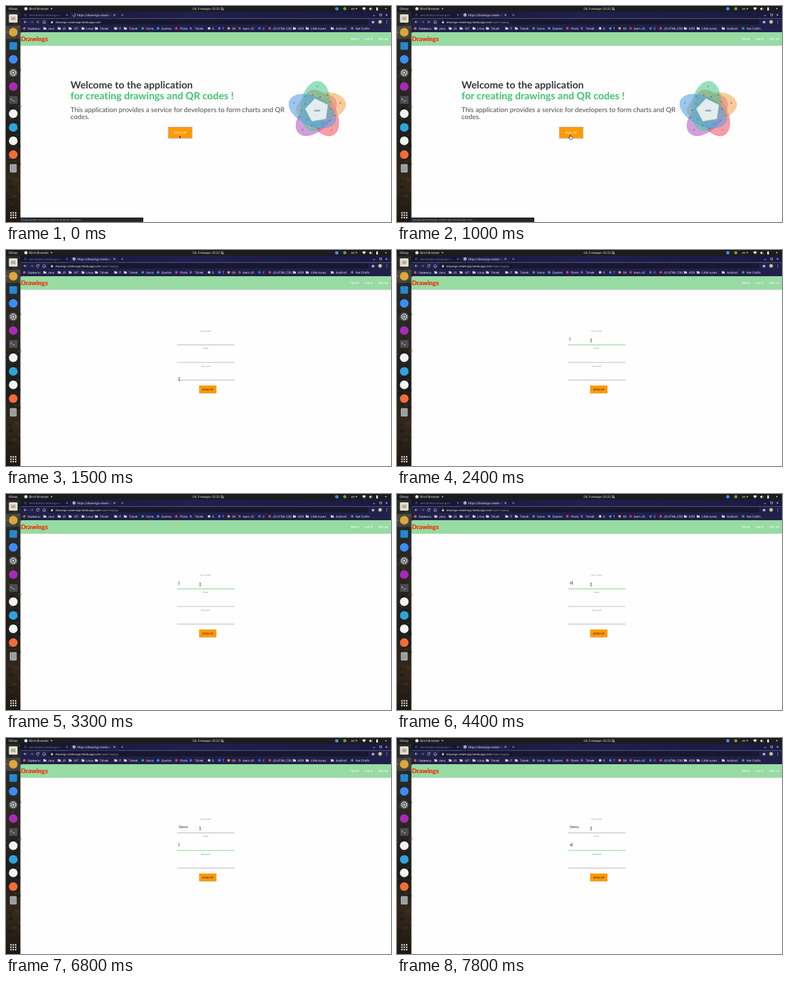
An HTML page that plays this animation: 600x338 px, repeating every 8000 ms.

```html
<!DOCTYPE html>
<html lang="ru">
<head>
<meta charset="utf-8">
<title>Sign up</title>
<style>
html, body { margin: 0; width: 100%; height: 100%; overflow: hidden; background: #fdfdfd; }
svg { display: block; width: 100vw; height: 100vh; }
text { font-family: Roboto, "Noto Sans", sans-serif; white-space: pre; text-rendering: geometricPrecision; font-variant-ligatures: none; }
.lato { font-family: Lato, sans-serif; }
.mid { text-anchor: middle; }
</style>
</head>
<body>
<svg id="stage" viewBox="0 0 600 338">
  <defs>
    <linearGradient id="wall" x1="0" y1="0" x2="0" y2="1">
      <stop offset="0" stop-color="#262a29"/><stop offset=".4" stop-color="#2b2620"/>
      <stop offset=".6" stop-color="#1b1d1d"/><stop offset=".8" stop-color="#33281a"/><stop offset="1" stop-color="#1d1812"/>
    </linearGradient>
    <linearGradient id="sky">
      <stop offset="0" stop-color="#15152f"/><stop offset=".45" stop-color="#201f4e"/><stop offset="1" stop-color="#191940"/>
    </linearGradient>
    <linearGradient id="fade"><stop offset=".7" stop-color="#20204a" stop-opacity="0"/><stop offset="1" stop-color="#20204a"/></linearGradient>
    <linearGradient id="fadeDark"><stop offset=".6" stop-color="#161632" stop-opacity="0"/><stop offset="1" stop-color="#161632"/></linearGradient>
    <pattern id="hatch" width="2" height="2" patternUnits="userSpaceOnUse" patternTransform="rotate(35)">
      <rect width="2" height=".9" fill="#fff" fill-opacity=".2"/>
    </pattern>
  </defs>
</svg>
<script>
const LOOP = 8000, STEP = 100;
const stage = document.getElementById('stage');

function el(tag, attrs, parent = stage) {
  const node = document.createElementNS('http://www.w3.org/2000/svg', tag);
  for (const key in attrs) node.setAttribute(key, attrs[key]);
  return parent.appendChild(node);
}
const group = (parent, attrs = {}) => el('g', attrs, parent);
const rect = (x, y, width, height, fill, parent, more) => el('rect', { x, y, width, height, fill, ...more }, parent);
const dot = (cx, cy, r, fill, parent, more) => el('circle', { cx, cy, r, fill, ...more }, parent);
const stroke = (d, color, width, parent, more) =>
  el('path', { d, fill: 'none', stroke: color, 'stroke-width': width, ...more }, parent);
function label(x, y, size, fill, string, parent, more) {
  const node = el('text', { x, y, 'font-size': size, fill, ...more }, parent);
  node.textContent = string;
  return node;
}
function random(seed) {
  return () => (seed = seed * 16807 % 2147483647) / 2147483647;
}
const show = (node, on) => node.setAttribute('visibility', on ? 'visible' : 'hidden');
const LATO = { class: 'lato' }, LATO_MID = { class: 'lato mid' }, BOLD = { class: 'lato', 'font-weight': 700 };
const HOST = 'drawings-create-app.herokuapp.com';

// Page background and header
rect(22, 40, 578, 298, '#fefefe');
rect(22, 62, 578, .7, '#000', stage, { opacity: .1 });
rect(22, 41, 578, 21, '#98dba3');
label(23.2, 55.2, 10, '#b3200c', 'Drawings', stage, BOLD);
label(22.8, 54.8, 10, '#f4501c', 'Drawings', stage, BOLD);
[[537.7, 'Home'], [559, 'Log in'], [580, 'Sign up']].forEach(([x, name]) => label(x, 53, 4.8, '#fff', name, stage, LATO));

// Welcome page
const welcome = group(stage);
label(100.5, 128.5, 15.6, '#3b3b3b', 'Welcome to the application', welcome, BOLD);
label(100.5, 145.5, 15.6, '#40c56f', 'for creating drawings and QR codes !', welcome, BOLD);
label(100.5, 165.5, 10.6, '#4c4c4c', 'This application provides a service for developers to form charts and QR', welcome, LATO);
label(100.5, 177.3, 10.6, '#4c4c4c', 'codes.', welcome, LATO);
rect(253, 189.5, 37, 17.5, '#ff9a05', welcome, { stroke: '#b9b3a8', 'stroke-width': 1 });
label(271.3, 200, 5, '#fff3dc', 'SIGN UP', welcome, LATO_MID);

// Five-set diagram: one ellipse turned in five steps
const chart = group(welcome, { transform: 'translate(485 163.5)' });
[[2, '#f0414f'], [3, '#a846bd'], [1, '#f29a3c'], [0, '#35c583'], [4, '#3f95e0']].forEach(([turn, fill]) => {
  const petal = group(chart, { transform: `rotate(${turn * 72}) translate(-3.2 -7) rotate(8)` });
  el('ellipse', { rx: 22.3, ry: 39, fill, 'fill-opacity': .56 }, petal);
  el('ellipse', { rx: 22.3, ry: 39, fill: 'url(#hatch)', stroke: fill, 'stroke-width': .6, 'stroke-dasharray': '1 .7' }, petal);
});
const polar = (r, degrees) => [r * Math.cos(degrees * Math.PI / 180), r * Math.sin(degrees * Math.PI / 180)];
el('polygon', {
  points: [0, 1, 2, 3, 4].map(i => polar(19.3, i * 72 - 100).map(v => v.toFixed(1))).join(' '),
  fill: '#e4ecee', stroke: '#8ba0a4', 'stroke-width': .6, 'stroke-linejoin': 'round'
}, chart);
function mark(r, degrees, string, size) {
  const [x, y] = polar(r, degrees);
  label(x, y + 1, size, '#2c3438', string, chart, { class: 'mid' });
}
[...'ABCDE'].forEach((name, i) => {
  const angle = i * 72 - 90, next = 'ABCDE'[(i + 1) % 5];
  mark(38, angle, name, 3.4);
  mark(29, angle + 32, name + next, 2.5);
  mark(22, angle + 12, name + next, 2.2);
  mark(25, angle - 16, next + name, 2.2);
});
label(0, 1.1, 3.5, '#20262a', 'NODE', chart, { class: 'mid' });

// Sign-up form
const form = group(stage);
const fields = [['Your Name', 127.6, 148.5], ['Email', 155.2, 176], ['Password', 183, 203.7]].map(([name, top, base]) => ({
  title: label(311, top, 3.5, '#9e9e9e', name, form, LATO_MID),
  line: rect(266.5, base - .35, 89.5, .7, '#9e9e9e', form),
  value: label(269.2, base - 7.3, 5.3, '#1c1c1c', '', form, { style: 'font-family:"Noto Sans",sans-serif' }),
  caret: rect(269.2, base - 12.2, .6, 6, '#222', form)
}));
rect(301, 212.8, 27, 12, '#000', form, { rx: 1, opacity: .22 });
rect(301, 212, 27, 12, '#ff9a05', form, { rx: .8 });
label(314.5, 219.7, 4.5, '#20180a', 'SIGN UP', form, LATO_MID);

// Desktop panel
rect(0, 0, 600, 9, '#1c1c1e');
const LIGHT = '#e6e6e6';
label(4, 6, 4.9, LIGHT, 'Обзор');
dot(31, 4.3, 2.5, '#e4e4e4');
label(36, 6, 4.9, LIGHT, 'Birch Browser');
label(291, 6, 4.8, LIGHT, 'Сб, 9 января  02:22');
stroke('M335 5.8h4l-.7-1v-1.5q-1.3-2-2.6 0v1.5zM334.5 2l5 5', LIGHT, .6);
dot(515.5, 4.3, 2.6, '#3b8df0');
dot(528, 4.3, 2.5, '#5aa637');
label(538, 6, 4.9, LIGHT, 'en');
const drop = x => el('path', { d: `M${x - 1.5} 3.6h3l-1.5 2z`, fill: LIGHT });
[71, 546, 592].forEach(drop);
el('path', { d: 'M555 3.2q3-2.4 6 0l-3 3.6z', fill: LIGHT });
el('path', { d: 'M566 3.6h1.2l1.8-1.5v5l-1.8-1.5H566z', fill: LIGHT });
stroke('M570 3q1.4 1.6 0 3.2', LIGHT, .6);
rect(577, 2.2, 2.6, 4.9, LIGHT);

// Browser frame
rect(22, 9, 578, 10.5, 'url(#sky)');
rect(22, 19.5, 578, 21.5, '#20204a');
const rnd = random(71);
for (let i = 0; i < 60; i++) dot(190 + rnd() * 370, 10 + rnd() * 8.5, .2 + rnd() * .25, '#8286b4', stage, { opacity: .4 });
dot(30, 14, 2.2, '#343849');
label(36, 15.7, 4.6, '#737889', 'deniskrelov/drawings-cr');
rect(60, 10, 32, 9, 'url(#fadeDark)');
el('path', { d: 'M98 19.5q2 0 2-2v-5q0-2 2-2h70q2 0 2 2v5q0 2 2 2z', fill: '#20204a' });
label(111, 15.7, 4.7, '#e8e8ee', 'https://' + HOST.slice(0, 17));
rect(135, 11, 30, 8, 'url(#fade)');
rect(164.9, 11, 8, 8, '#20204a');
const cross = (x, y, r, color) =>
  stroke(`M${x - r} ${y - r}l${2 * r} ${2 * r}M${x + r} ${y - r}l${-2 * r} ${2 * r}`, color, .7);
cross(95, 14, 1.3, '#9aa0b0');
cross(169, 14, 1.3, '#d8d8e0');
stroke('M179.2 14h4M181.2 12v4', '#8c8ea6', .7);
const spinner = stroke('M106 11.8a2.2 2.2 0 1 1-2.2 2.2', '#b9c3df', .8);
const tabIcon = group(stage);
dot(106, 14, 2.4, '#d4d8e0', tabIcon);
stroke('M103.6 14h4.8M106 11.6v4.8', '#454a60', .5, tabIcon);
stroke('M572 15h3.2', LIGHT, .7);
rect(582.5, 12.5, 3, 3, 'none', stage, { stroke: LIGHT, 'stroke-width': .6 });
cross(593, 14, 1.4, LIGHT);

// Toolbar
rect(66, 20.7, 499, 8.3, '#17172f', stage, { rx: 4.1 });
stroke('M32.3 25h-4.4m2-2l-2 2l2 2', '#dcdce4', .7);
stroke('M37.7 25h4.4m-2-2l2 2l-2 2', '#7a7d8c', .7);
const stopIcon = cross(49.5, 25, 1.7, '#dcdce4');
const reloadIcon = stroke('M51.4 24a2.1 2.1 0 1 0 .1 1.9M51.6 22.6v1.6h-1.6', '#dcdce4', .7);
stroke('M57 25l2.5-2.3l2.5 2.3M57.8 24.8v2.3h3.4v-2.3', '#dcdce4', .7);
rect(70, 24.4, 3.2, 2.6, '#c9cad4');
stroke('M70.7 24.4v-.8q.9-1.6 1.8 0v.8', '#c9cad4', .5);
const address = label(77, 26.6, 4.35, '#f0f0f4', HOST);
const path = el('tspan', { fill: '#9498a8' }, address);
el('path', { d: 'M572 22.4l.8 1.8l2 .2l-1.5 1.3l.4 1.9l-1.7-1l-1.7 1l.4-1.9l-1.5-1.3l2-.2z', fill: '#cfd2de' });
dot(583, 24.8, 2.8, '#cfc08a');
[22.9, 24.9, 26.9].forEach(y => dot(593.5, y, .5, LIGHT));

// Bookmarks: icon x, text x, name, icon colour (folder when absent)
[[28.5, 33.5, 'Сервисы', '#d8623f'], [60.5, 65, 'Java'], [83, 87.5, 'JS'], [100, 106, 'GIT'], [120, 125, 'Linux'],
 [141, 146, 'Tolvek'], [171, 176, 'IT'], [186, 191.5, 'Tolvek'], [213, 218, 'Varno', '#3aa268'],
 [237, 242, 'Queries', '#3d94df'], [265.5, 271, 'Plonk', '#d6417f'], [288, 294, 'Tolvek', '#7b52c9'],
 [316.5, 321, 'G', '#d8d8d8'], [332.5, 337, 'T', '#4784e8'], [347, 352, 'GK', '#e9a83a'], [364, 369, 'learn JS', '#c9413c'],
 [395, 400, 'C', '#3972c4'], [411, 415.5, 'JS HTML CSS', '#d84936'], [449.5, 455, 'KDR'], [469.5, 475, 'Little tunes'],
 [508.5, 514, 'Android'], [539.5, 545, 'Net Crafts', '#3ca55a']].forEach(([ix, tx, name, color]) => {
  if (color) dot(ix, 35, 2.1, color);
  else el('path', { d: `M${ix - 2.3} 33h1.8l.6.7h2.2v3.3h-4.6z`, fill: '#c9cbd5' });
  label(tx, 36.8, 4.8, '#e4e4ea', name);
});

// Launcher
rect(0, 9, 22.5, 329, 'url(#wall)');
for (let i = 0; i < 60; i++) {
  el('ellipse', { cx: rnd() * 22, cy: 12 + rnd() * 323, rx: 1.5 + rnd() * 3, ry: 1 + rnd() * 2.2,
    fill: i % 2 ? '#5c4a2e' : '#0c0d0d', opacity: .25 });
}
rect(0, 31, 22.5, 20.5, '#fff', stage, { opacity: .13 });
rect(4.5, 13, 13.5, 13, '#e2ddd2', stage, { rx: 1.5 });
rect(8, 17, 6.6, 5, '#b9ac93', stage, { rx: .6 });
dot(.9, 41, .9, '#e8632b');
[[41, '#dca63a'], [83.5, '#3b8df5'], [168.5, '#f4f2f4'], [190, '#2fa3dc'], [211, '#f2f4f0'], [232.5, '#f26b3a']]
  .forEach(([y, color]) => dot(11.3, y, 6.8, color));
rect(5.3, 56.5, 12, 12, '#2688cf', stage, { rx: 1.5 });
dot(11.3, 126, 6.8, '#a52bb5');
dot(11.3, 104.5, 6.8, '#53575b');
dot(11.3, 104.5, 4, 'none', stage, { stroke: '#e5e5e5', 'stroke-width': 1.7, 'stroke-dasharray': '2.2 .9' });
dot(11.3, 104.5, 1.6, '#d9d9d9');
rect(4.8, 141, 13.2, 12, '#4c4d52', stage, { rx: 1.5 });
stroke('M7 144.5l2 1.6l-2 1.6M10.5 148.4h3', '#d5d5d5', .8);
rect(6, 247.5, 10.6, 13, '#a6a9aa', stage, { rx: 1.2 });
stroke('M8.5 250v8M11.3 250v8M14 250v8', '#7c8082', .8);
for (let i = 0; i < 9; i++) rect(6.6 + i % 3 * 3.7, 322.6 + Math.floor(i / 3) * 3.7, 2.2, 2.2, '#eee', stage, { rx: .4 });

// Status line
const status = group(stage);
rect(22, 331, 192, 7, '#26272b', status, { rx: .8 });
const statusText = label(23.5, 336.2, 4.4, '#92949c', '', status);

// Pointers
const arrow = el('path', { d: 'M269.8 202.2v4.6l1.1-1l.8 1.8l.9-.4l-.8-1.7h1.4z', fill: '#151515', stroke: '#fff', 'stroke-width': .3 });
const hand = el('path', {
  transform: 'translate(270 202)', fill: '#fff', stroke: '#151515', 'stroke-width': .7,
  d: 'M-.6 0q.7-.8 1.3 0v2l2.3.7q.7.4.4 1.6l-.6 2.2h-3.4l-2-2.6q0-.9 1-.4l1 .7z'
});
const beam = stroke('M-1.3-2.6q1 0 1.3.6q.3-.6 1.3-.6M0-2v4M-1.3 2.6q1 0 1.3-.6q.3.6 1.3.6', '#333', .7);

// Timeline
const REQUEST = 500, FORM = 1200, LOADED = 1400;
const POINTER = [[0, 270, 202], [1600, 270, 202], [1700, 279, 183], [1800, 293, 151], [1900, 297, 147], [2000, 302.5, 141.5]];
const NAME_KEYS = [4000, 4600, 5000, 5300, 5800];
const EMAIL_KEYS = [7800];
const GRAY = [158, 158, 158], GREEN = [82, 190, 100], TEAL = [42, 184, 164];

const ramp = (t, from, length) => Math.min(1, Math.max(0, (t - from) / length));
const mix = (a, b, k) => `rgb(${a.map((v, i) => Math.round(v + (b[i] - v) * k))})`;
const within = (t, from, to) => t >= from && t < to;
const typed = (word, keys, t) => word.slice(0, keys.filter(at => t >= at).length);

function pointerAt(t) {
  let i = POINTER.length - 1;
  while (POINTER[i][0] > t) i--;
  const a = POINTER[i], b = POINTER[i + 1] || a;
  const k = a === b ? 0 : (t - a[0]) / (b[0] - a[0]);
  return [a[1] + (b[1] - a[1]) * k, a[2] + (b[2] - a[2]) * k];
}

function fillField(field, text, caretOn) {
  if (field.value.textContent !== text) field.value.textContent = text;
  const width = text ? field.value.getComputedTextLength() + .2 : 0;
  field.caret.setAttribute('x', 269.2 + width);
  show(field.caret, caretOn);
}

function draw(t) {
  const onForm = t >= FORM, loading = t < LOADED, requested = t >= REQUEST;
  show(welcome, !onForm);
  form.setAttribute('display', onForm ? 'inline' : 'none');
  show(status, !onForm);
  show(arrow, !requested);
  show(hand, requested && !onForm);
  show(beam, onForm);
  show(spinner, !requested);
  show(tabIcon, requested);
  show(stopIcon, loading);
  show(reloadIcon, !loading);
  spinner.setAttribute('transform', `rotate(${t * .36} 106 14)`);
  path.textContent = requested ? '/users/signup' : '';
  statusText.textContent = requested ? `Ожидание ${HOST}...` : 'Разрешение хоста в скрипте прокси-сервера...';
  beam.setAttribute('transform', `translate(${pointerAt(t)})`);
  if (!onForm) return;

  const [name, email, password] = fields;
  const nameFocus = ramp(t, 2100, 300) - ramp(t, 6300, 200);
  const emailFocus = ramp(t, 6600, 200);
  name.line.setAttribute('fill', mix(GRAY, GREEN, nameFocus));
  email.line.setAttribute('fill', mix(GRAY, GREEN, emailFocus));
  email.title.setAttribute('fill', mix(GRAY, t < 5300 ? GREEN : TEAL, ramp(t, 2100, 300) - emailFocus));
  password.title.setAttribute('fill', mix(GRAY, TEAL, emailFocus));
  fillField(name, typed('Denis', NAME_KEYS, t), within(t, 2200, 2700) || within(t, 3300, 6400));
  fillField(email, typed('d', EMAIL_KEYS, t), within(t, 6700, 7300) || t >= 7800);
  show(password.caret, false);
}

const start = performance.now();
function tick() {
  const t = (performance.now() - start) % LOOP;
  draw(Math.floor(t / STEP) * STEP);
  requestAnimationFrame(tick);
}
tick();
</script>
</body>
</html>
```
